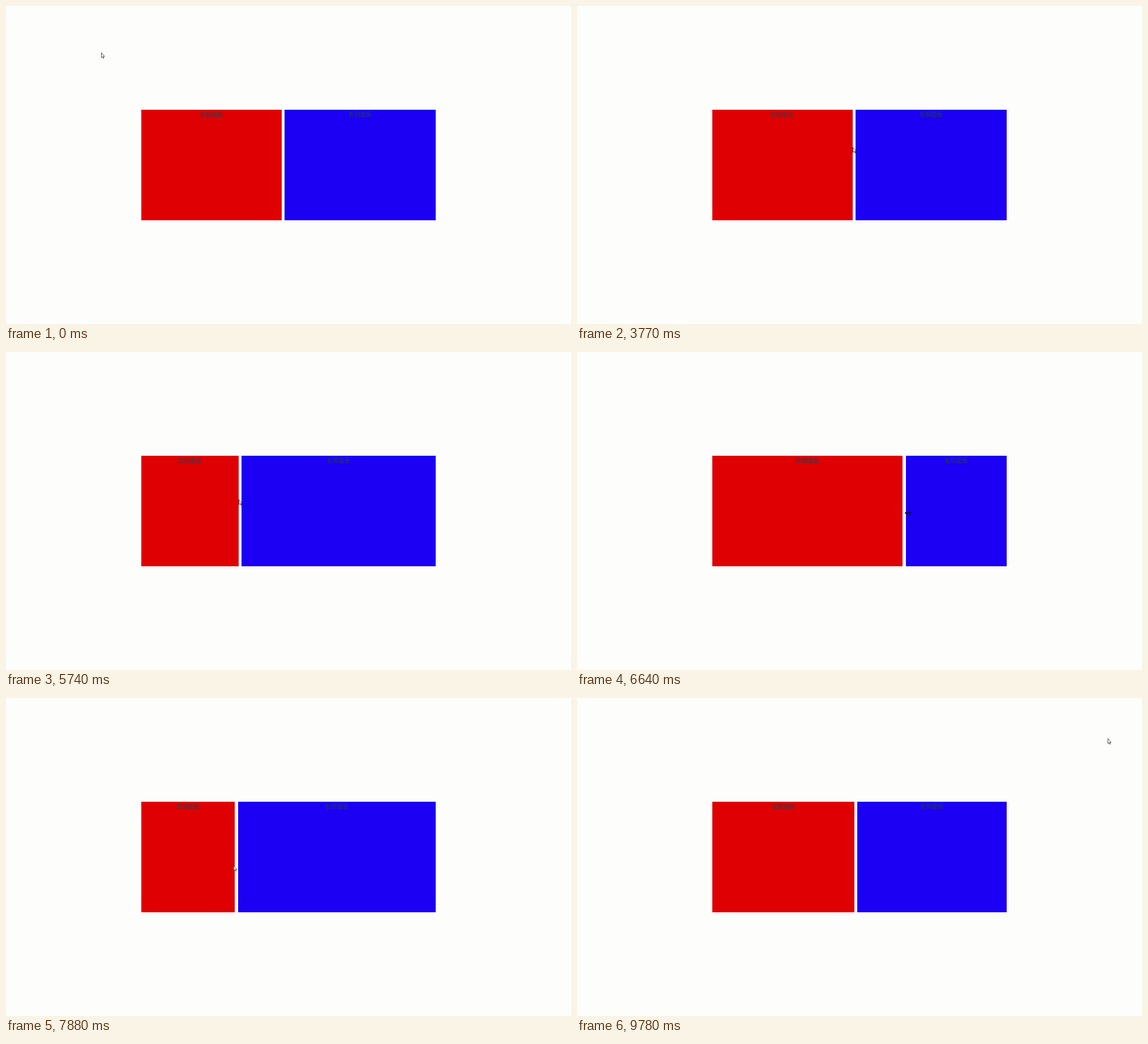
An HTML page that plays this animation: 998x561 px, repeating every 9910 ms.

```html
<!DOCTYPE html>
<html lang="zh">
<head>
<meta charset="utf-8">
<title>Split panels</title>
<style>
  html, body { margin: 0; width: 100%; height: 100%; overflow: hidden; background: #fdfdfc; }
  svg { display: block; width: 998px; height: 561px; }
  text {
    font: 10.4px "Noto Sans CJK SC", "Noto Sans CJK", sans-serif;
    fill: #2c3e50; fill-opacity: .88; text-anchor: middle;
  }
</style>
</head>
<body>
<svg viewBox="0 0 998 561">
  <g shape-rendering="crispEdges">
    <rect id="left" x="239" y="183" height="195" fill="#de0003"/>
    <rect id="right" y="183" height="195" fill="#1b00f4"/>
  </g>
  <text id="leftLabel" y="195.3">左侧面板</text>
  <text id="rightLabel" y="195.3">右侧面板</text>
  <rect id="bar" y="185" width="2" height="191" rx="1" fill="#409eff"/>
  <path id="arrow" d="M.5 .5V9.2L2.5 7.4L3.8 10.3L5 9.8L3.7 7H6.2Z" fill="#fff" stroke="#222" stroke-width=".8"/>
  <path id="resize" d="M0 0l3-2.5v1.9h2v-2.9h.5v7H5V.6H3v1.9ZM12 0l-3-2.5v1.9H7v-2.9h-.5v7H7V.6h2v1.9Z" fill="#111"/>
</svg>
<script>
const LOOP = 9910, LEFT = 239, RIGHT = 759, GAP = 5.7, LAG = 20;
const DRAG_START = 4570, DRAG_END = 8820;

const clamp = (v, low, high) => Math.min(high, Math.max(low, v));
const progress = (t, start, end) => clamp((t - start) / (end - start), 0, 1);
const swing = u => (1 - Math.cos(Math.PI * u)) / 2;
const easeOut = u => u * (2 - u);

// Pointer gestures; the pointer rests between them.
const home = { x: 168, y: 82 };
const moves = [
  { start: 20, end: 560, x: 757, y: 371 },
  { start: 560, end: 1040, x: 487, y: 262 },
  { start: 1540, end: 1740, x: 488.6, y: 265 },
  { start: 2140, end: 2540, x: 490, y: 89 },
  { start: 2740, end: 3150, x: 487, y: 364 },
  { start: 3150, end: 3570, x: 487, y: 249 },
  { start: 4570, end: 5740, x: 411, y: 260, ease: easeOut },
  { start: 5740, end: 6840, x: 593, y: 286 },
  { start: 6840, end: 8080, x: 389, y: 296 },
  { start: 8080, end: 8800, x: 490, y: 280 },
  { start: 8800, end: 9350, x: 961, y: 76 },
  { start: 9350, end: 9780, x: 937.3, y: 71.3 }
];

function pointer(t) {
  let { x, y } = home;
  for (const move of moves) {
    const u = (move.ease || swing)(progress(t, move.start, move.end));
    x += (move.x - x) * u;
    y += (move.y - y) * u;
  }
  return { x, y };
}

// While dragged, the splitter follows the pointer with a short delay.
const splitAt = t => pointer(clamp(t - LAG, DRAG_START, DRAG_END - LAG)).x - .5;

function set(id, attrs) {
  const node = document.getElementById(id);
  for (const name in attrs) node.setAttribute(name, attrs[name]);
}

function draw(t) {
  const { x, y } = pointer(t), split = splitAt(t), start = split + GAP;
  set("left", { width: split - LEFT });
  set("right", { x: start, width: RIGHT - start });
  set("leftLabel", { x: (LEFT + split) / 2 });
  set("rightLabel", { x: (start + RIGHT) / 2 });
  set("bar", { x: split + 1.8, opacity: progress(t, 3970, 4210) - progress(t, 5200, 5400) });

  const resizing = t > DRAG_START && t < DRAG_END && x - split > 2.5;
  const transform = `translate(${x} ${y})`;
  set("arrow", { transform, visibility: resizing ? "hidden" : "visible" });
  set("resize", { transform, visibility: resizing ? "visible" : "hidden" });
}

const began = performance.now();
function tick() {
  draw((performance.now() - began) % LOOP);
  requestAnimationFrame(tick);
}
tick();
</script>
</body>
</html>
```
